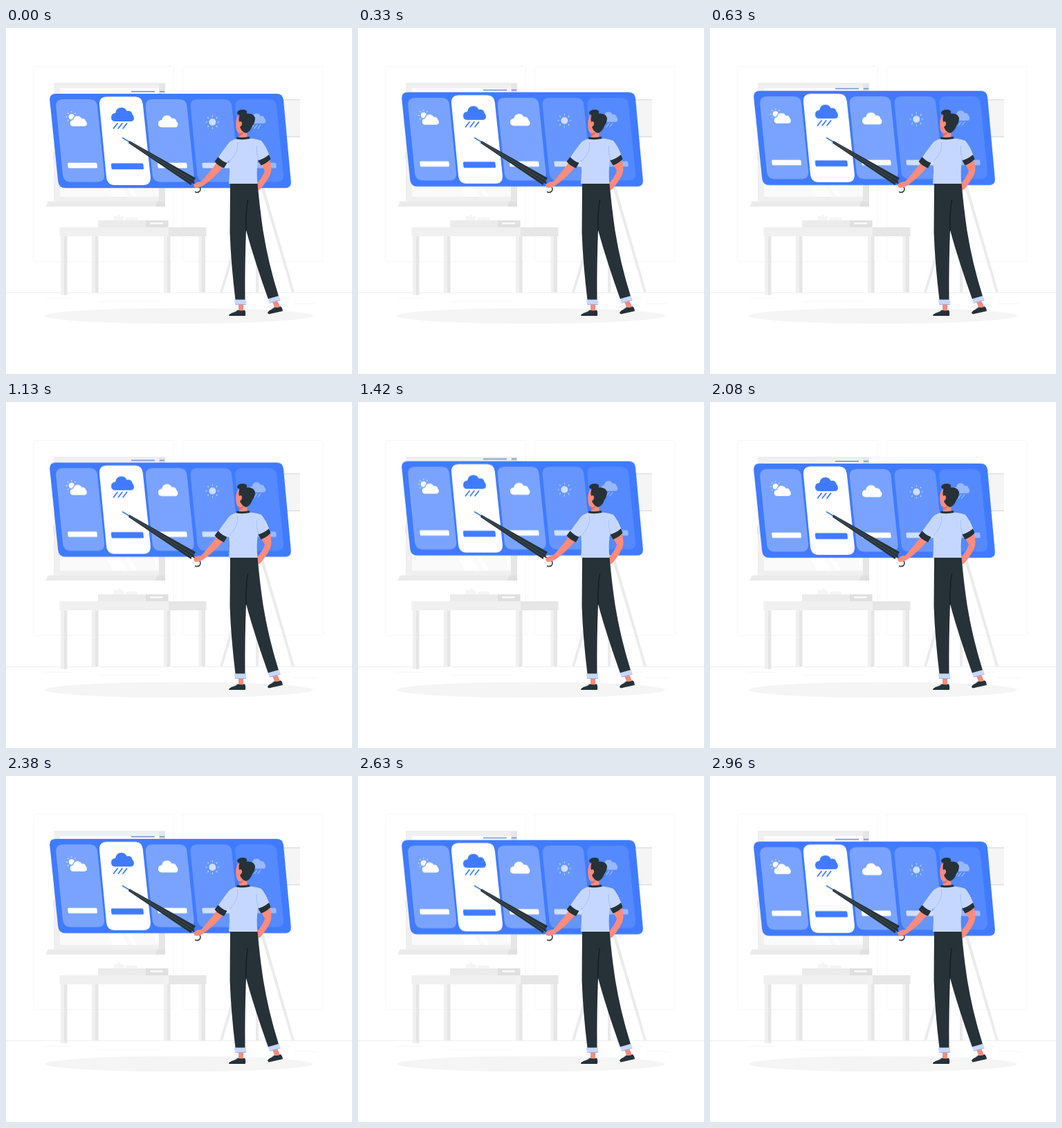
An HTML page for the animation above (3000 ms loop, 500x500 px).

```html
<!DOCTYPE html>
<html lang="en">
<head>
<meta charset="utf-8">
<title>Weather forecast</title>
<style>
  html, body { margin: 0; width: 100%; height: 100%; overflow: hidden; background: #fff; }
  svg { display: block; width: 100vw; height: 100vh; }
  .float { animation: float 3s linear infinite; }
  @keyframes float { 50% { transform: translateY(-10px); } }
  .skin { fill: #ff8b7b; }
  .dark { fill: #263238; }
  .shirt { fill: #c6d7ff; }
  .blue { fill: #407bff; }
  .white { fill: #fff; }
  .line { fill: none; stroke-linecap: round; }
</style>
</head>
<body>
<svg viewBox="0 0 500 500">
  <defs>
    <path id="cloud" d="M6 20Q0 20 0 14Q0 8.4 6 7.9Q7.500 0 14.500 0Q20.500 0 22.500 5Q29.500 4 30.800 10.300Q33.300 12 33 15.500Q32.500 20 28 20Z"/>
    <path id="rain" class="line" d="M9 23L3.500 30M15.800 23L10.300 30M22.600 23L17.100 30" stroke-width="1.9"/>
    <g id="sun">
      <circle r="5"/>
      <circle r="8.700" fill="none" stroke="#fff" stroke-width="2.300" pathLength="40" stroke-dasharray=".8 4.200" stroke-dashoffset=".4"/>
    </g>
    <path id="card" d="M83 103H121Q131 103 132 113L142 211Q143 222.500 132 222.500H94Q83 222.500 82 211L72.300 114Q71.500 103 83 103Z"/>
    <path id="bar" d="M90.500 194.800H129.800Q131.300 194.800 131.500 196.300L132 201Q132.200 202.600 130.500 202.600H91.300Q89.800 202.600 89.700 201L89.200 196.300Q89 194.800 90.500 194.800Z"/>
  </defs>

  <!-- room -->
  <g fill="none" stroke="#f6f6f6">
    <rect x="39.500" y="55.500" width="203" height="282" rx="3"/>
    <rect x="255.500" y="55.500" width="203" height="282" rx="3"/>
    <path d="M57 390.500H95M134 395.500H224M380 390.500H410M415 398.500H448"/>
    <path d="M0 382.500H500" stroke="#efefef"/>
  </g>
  <ellipse cx="250" cy="416" rx="194" ry="11.300" fill="#f5f5f5"/>

  <!-- window -->
  <path fill="#f0f0f0" d="M69 80H222V251H69Z"/>
  <path fill="#e6e6e6" d="M221 80H230V251H221ZM69 79.500H230V80.500H69Z"/>
  <path fill="#fafafa" d="M78 87H221V244H78Z"/>
  <path class="white" d="M78 87H221V90H78ZM130 200H149L176 244H155ZM157 200H163L190 244H183ZM216 200H218V238H216Z"/>
  <path fill="#ebebeb" d="M68 179H71V190H68ZM61 250.500H230V258H57Z"/>
  <path fill="#e0e0e0" d="M219 250.500H230V258H215.500Z"/>

  <!-- flipchart -->
  <path fill="#ebebeb" d="M357 222H361L313 382H309ZM361 222H365V382H361ZM366 222H370.500L417 382H413Z"/>
  <path fill="#f5f5f5" d="M330 103H425V158H330Z"/>
  <path fill="#e0e0e0" d="M330 103H425V104.500H330ZM330 156.500H425V158H330Z"/>

  <!-- table -->
  <path fill="#f5f5f5" d="M156 272H160L162 269.500H164L166 272H170V278H156ZM173 274H179L181 272.500L183 274H190V278H173Z"/>
  <path fill="#ebebeb" d="M133 278H202V288H133Z"/>
  <path fill="#e0e0e0" d="M202 278H234.500V288H202Z"/>
  <rect x="208" y="281" width="19" height="2.500" rx="1" fill="#fafafa"/>
  <path fill="#f0f0f0" d="M77.500 288H235V301H77.500ZM79 301H84V386H79ZM124 301H129V382H124ZM228 301H233V382H228ZM278.500 301H283V382H278.500Z"/>
  <path fill="#e6e6e6" d="M235 288H289.500V301H235ZM84 301H88.500V386H84ZM129 301H133.500V382H129ZM233 301H237.500V382H233ZM283 301H288V382H283Z"/>

  <!-- forecast panel -->
  <g class="float">
    <path d="M181 91.800H215M222 91.800H229" stroke="#4a78c8" stroke-width="1.200"/>
    <path class="blue" d="M72 95H391Q400 95 401 104L411.800 222Q412.500 231.300 403.500 231.300H86Q76.500 231.300 75.300 222L63.200 104Q62.500 95 72 95Z"/>
    <g class="white">
      <use href="#card" opacity=".3"/>
      <use href="#card" x="129.500" opacity=".3"/>
      <use href="#card" x="194.300" opacity=".2"/>
      <use href="#card" x="259" opacity=".1"/>
      <path d="M146 99.300H186.500Q196.500 99.300 197.800 110L208.800 215Q209.800 227 198.500 227H157Q146 227 145 215L135 111Q134.200 99.300 146 99.300Z"/>
      <use href="#bar"/>
      <use href="#bar" x="129.700"/>
      <use href="#bar" x="194.200" opacity=".7"/>
      <use href="#bar" x="258.700" opacity=".4"/>
      <use href="#sun" transform="translate(94.800 128.300) scale(.82)"/>
      <use href="#cloud" transform="translate(92.700 127.200) scale(.735)" stroke="#79a3ff" stroke-width="3.500" paint-order="stroke"/>
      <use href="#cloud" transform="translate(220 126.300) scale(.86)"/>
      <use href="#sun" transform="translate(298.300 136)" opacity=".7"/>
      <g transform="translate(351.500 123.500) scale(.72)" opacity=".4">
        <use href="#cloud"/>
        <use href="#rain" stroke="#fff"/>
      </g>
    </g>
    <path class="blue" d="M153.500 195.500H196.500Q198.200 195.500 198.400 197L199 202.700Q199.100 204.300 197.300 204.300H154.300Q152.700 204.300 152.500 202.700L151.900 197Q151.800 195.500 153.500 195.500Z"/>
    <g transform="translate(152 115)">
      <use href="#cloud" class="blue"/>
      <use href="#rain" stroke="#407bff"/>
    </g>
  </g>

  <!-- umbrella -->
  <g class="line">
    <path d="M168.500 158.800L179 165" stroke="#407bff" stroke-width="1.700"/>
    <path d="M268 222L279 229" stroke="#263238" stroke-width="2"/>
    <path d="M280 229.500Q282.500 235 278.500 237Q276 238.200 273.500 236.800" stroke="#263238" stroke-width="1.400"/>
  </g>
  <path class="dark" d="M178.500 163L274 216.700L271.500 220.500L272.500 222L268.500 223.500L267.500 227.300L177 166.300Z"/>
  <path d="M180 165L271.500 220.500M179 165.500L268.500 223.500" fill="none" stroke="#56616a" stroke-width=".7"/>

  <!-- presenter -->
  <path class="skin" d="M305 194L314.500 200Q302 216 284.500 228Q279 232 272.500 230.500L271 226.500Q274 222 282 222Q293 210 305 194Z"/>
  <path class="skin" d="M369 197L381 190Q385.500 202 382 211Q377 222 367.500 233L362 235V225Q371 216 374 206Z"/>
  <path class="skin" d="M336 399H343V410H336ZM385 396L392 394L396.500 404L389 406Z"/>
  <path class="dark" d="M322 415.500Q323 412.500 329 411L335 407.500Q340 409.500 345 407.500Q347 411 345.700 416H322ZM378 412Q378.500 409 383 407L388 403.500Q393 405 397 402.300Q400 405 400 409L380 413.500Z"/>
  <path d="M330.500 410L335.500 406.500M383.500 406L388 402.500" stroke="#c6d7ff" stroke-width="1.500"/>
  <path class="dark" d="M324 224H363.500Q366 255 371.500 293Q379 340 394 387.500L379 392Q358 333 347 292Q345 340 345.500 393H331.500Q325 340 323.500 295Z"/>
  <path d="M349.500 248Q346 270 347 293" fill="none" stroke="#131a1e" stroke-width="1.300"/>
  <path class="shirt" d="M330 392.500H347V399.500H331ZM378.500 391.500L394.500 387L396.500 393.300L381 397.500Z"/>
  <path d="M331 399.500H347M381 397.500L396.500 393.300" stroke="#8eabdc" stroke-width=".8"/>
  <path class="shirt" d="M333 160Q324 162 319 170Q312 179 306 188L317 198L322.500 191Q324 208 322 225H363.500Q361.500 209 364 190L369 196L381 185Q376 171 369 163Q363 160 352 159.500Z"/>
  <path d="M334.500 165Q337 178 323 193M362.500 170Q361 181 365 191" fill="none" stroke="#9db9fb" stroke-width=".8"/>
  <path class="dark" d="M306.500 186.300Q312 192.500 319.500 195L315 202.500Q306 199 301.500 193ZM364.500 191.500Q373 189 380 183L382.500 189.500Q376 196 368.500 198.500Z"/>
  <path class="skin" d="M335 127Q331.500 133 332.500 143Q333 152 338.500 152.500L337 158Q343 161.500 348.500 158L348 147L346 127Z"/>
  <path d="M338 152.500Q342 152 344 149Q344 154 337.500 156Z" fill="#df6f62"/>
  <path class="dark" d="M333.500 157.500Q343 159 351.500 157L352.500 160Q343 162 333 160.500Z"/>
  <path class="dark" d="M334 122.500Q335 118 342 118Q347 117.700 348 120.500Q348.700 122 347.500 123.500Q358 122.500 360 130Q360 137 356 141.500Q353.500 149.500 347 152Q340 149.500 338 143Q342 141 340.500 136Q338.500 134 337 136.500Q335.500 131 337.500 125.500Q334 125 334 122.500Z"/>
  <circle class="skin" cx="338.500" cy="138" r="2.400"/>
</svg>
</body>
</html>
```
